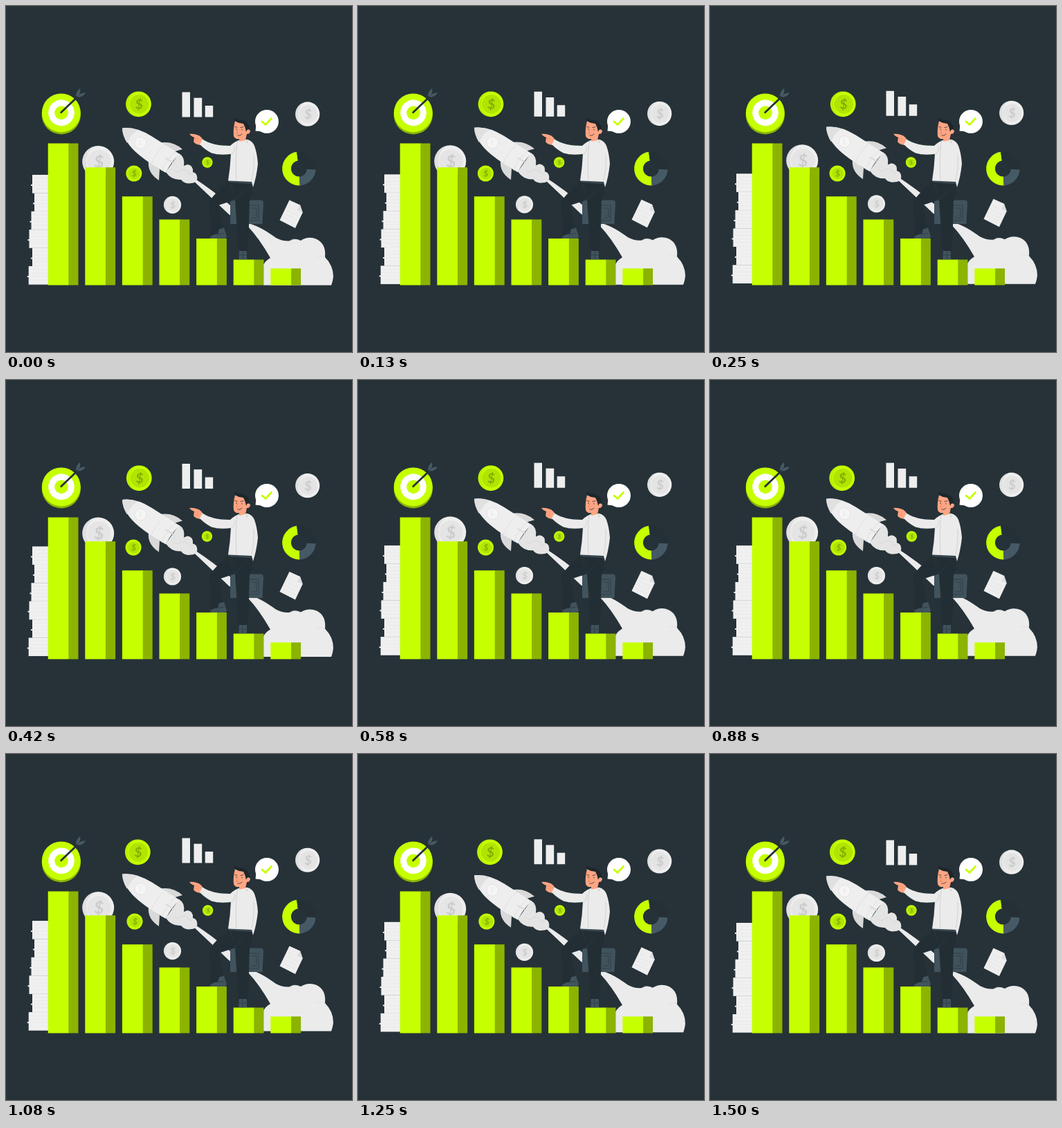
Animation of 500x500 px, one loop 1540 ms. Source, as an HTML page:

```html
<!DOCTYPE html>
<html lang="en">
<head>
<meta charset="utf-8">
<title>Growth chart</title>
<style>
  html, body { margin: 0; width: 100%; height: 100%; overflow: hidden; background: #263238; }
  svg { display: block; width: 100vw; height: 100vh; }
  .line { fill: none; stroke-linecap: round; stroke-linejoin: round; }
  .green { color: #c6ff00; --face: .1; --sign: .24; }
  .pale { color: #eee; --face: .04; --sign: .1; }
</style>
</head>
<body>
<svg viewBox="0 0 500 500">
  <defs>
    <g id="coin">
      <circle r="20" fill="currentColor"/>
      <path d="M-4-19.6A20 20 0 0 0-4 19.6A23 23 0 0 1-4-19.6" opacity=".06"/>
      <circle cx="1" r="15" style="opacity: var(--face)"/>
      <text x="1" y="7.5" text-anchor="middle" font-family="Lato, sans-serif" font-weight="700" font-size="21" transform="rotate(5)" style="opacity: var(--sign)">$</text>
    </g>
  </defs>

  <g id="bob">
    <g id="papers" fill="#f0f0f0"></g>
    <g class="pale">
      <use href="#coin" transform="translate(133.2 225) scale(1.15)"/>
      <use href="#coin" transform="translate(240.5 287.5) scale(.63)"/>
      <use href="#coin" transform="translate(435.7 156.2) scale(.88)"/>
    </g>
    <path d="M254.5 124.5h11.5v36h-11.5zM271.5 132.7h11.7v27.8h-11.7zM287.7 144h11.5v16.5h-11.5z" fill="#eee"/>

    <!-- rocket and exhaust -->
    <path d="M269 247Q300 267 324 288L352 314.5C366 319 378 326 390 335Q402 341 411 339Q418 335 426 339Q437 332 449 337Q463 344 461 363Q473 375 473 391Q472 399 470 403.5H372V374Q375 368 382 364Q366 336 350 319L322 301Q302 282 267 249" fill="#ebebeb"/>
    <path d="M411 339Q416 335 424 339M449 362Q456 360 461 363" class="line" stroke="#ddd" stroke-width=".7"/>
    <path d="M221 198Q240 194 255 207L241 211ZM206 224Q204 241 221 252L222 236Z" fill="#d9d9d9"/>
    <path d="M231 240Q239 252 253 251Q258 258 268 256Q278 255 276 246Q275 241 270 240Q271 230 262 229L257 231Q259 218 250 213Z" fill="#e4e4e4"/>
    <path d="M243 238Q249 243 252 238Q257 235 262 239Q264 244 270 243" class="line" stroke="#d4d4d4" stroke-width=".8"/>
    <path d="M168 176.5Q188 174 211 188.5L251 214Q239 224 231 241Q209 229 192 215Q170 197 168 176.5" fill="#eee"/>
    <path d="M168 176.5Q179 175 190 179Q180 186 175 198Q168 187 168 176.5" fill="#e0e0e0"/>
    <path d="M229 201Q215 214 210 228M244 211Q231 222 225 238" class="line" stroke="#dcdcdc" stroke-width=".8"/>
    <path d="M231 220L242 227" class="line" stroke="#d8d8d8" stroke-width="1.6"/>
    <circle cx="194.5" cy="198" r="8.5" fill="#f5f5f5" stroke="#e4e4e4"/>
    <path d="M194 194v7" class="line" stroke="#e2e2e2"/>

    <path d="M409.5 280.5L425 287.5L428.7 298.5L418 321L395.5 309.5Z" fill="#eee"/>
    <path d="M425 287.5L421 295L428.7 298.5Z" fill="#dedede"/>
    <path d="M408 290l9 4M405 295l17 8M402 300l17 8M400 305l17 8" class="line" stroke="#e2e2e2" stroke-width=".7"/>
  </g>

  <g id="bars"></g>

  <g class="green">
    <use id="coinA" href="#coin"/>
    <use id="coinB" href="#coin"/>
    <use id="coinC" href="#coin"/>
  </g>

  <!-- target -->
  <circle cx="79.8" cy="157.3" r="28.1" fill="#8bb300"/>
  <circle cx="79.8" cy="154.4" r="28" fill="#c6ff00"/>
  <circle cx="80" cy="154.4" r="18.8" fill="#fff"/>
  <circle cx="80" cy="154.4" r="9.8" fill="#c6ff00"/>
  <path d="M79.7 153.8L103 131.5" class="line" stroke="#263238" stroke-width="2.8"/>
  <path d="M101 130.5Q101 123 107 119Q109 126 103 130.5ZM103 131.5Q107 124.5 115 125.5Q111 132.5 103 131.5" fill="#455a64"/>

  <!-- donut -->
  <g fill="none" stroke-width="12.8">
    <path d="M421 217.2A18 18 0 0 0 424.3 253" stroke="#c6ff00"/>
    <path d="M424.3 253A18 18 0 0 0 441.2 236" stroke="#455a64"/>
    <path d="M441.2 236A18 18 0 0 0 421 217.2" stroke="#243036"/>
  </g>

  <!-- man with briefcase -->
  <path d="M326 280.5H368Q372 280.5 372 285L370.5 315H324V285Q324 280.5 326 280.5" fill="#41535d"/>
  <path d="M335 281v-4h18v4M351 288h14v22h-14M355 292h7v14h-7" class="line" stroke="#2c3a42" stroke-width=".8"/>
  <path d="M322 253L355 254Q358 268 352 281L350 355H336L331 280L307 288L316 329L296 332L294 283Q297 275 322 253" fill="#232e34"/>
  <path d="M329 280Q337 276 342 267M325 258Q326 265 329 268" class="line" stroke="#2e3c44" stroke-width=".7"/>
  <path d="M322 252L355 254V257L322 255Z" fill="#37474f"/>
  <path d="M294.5 335.5Q297 330 306 329.5L308 322.5L315 320.5L319 333L317 336H294.5ZM336.8 354H348V366H336.5Z" fill="#41535d"/>
  <path d="M306 329.5l9-1M337 360h11M342 354v12" class="line" stroke="#2c3a42" stroke-width=".7"/>
  <path d="M265 185Q271 184 277 186.5Q282 188 285 194L281 201Q273 200 271 196L272 190Q267 188 265 185" fill="#ffa583"/>
  <path d="M273 190l5 2M272 194l5 1" class="line" stroke="#e08468" stroke-width=".6"/>
  <path d="M284 192.5Q298 202 324 202Q331 195 340 193H349Q356 195 359 202Q363 213 364 228Q362 247 357 262L355 254L321 252.5Q324 234 325 214Q308 216 297 212.5Q288 208 280 200Z" fill="#ebebeb"/>
  <path d="M325 214Q331 211 331 203M334 196Q331 222 333 252M346 196l3 2l-1-5M358 215Q359 236 355 252" class="line" stroke="#c8c8c8" stroke-width=".7"/>
  <path d="M331 166Q328 178 329 188Q331 193 337 192L337 196L346 194L348 185Q353 185 353 180Q350 177 348 179L345 167Z" fill="#ffa583"/>
  <path d="M331 166.5L330 160.5Q334 165 340 164.5Q351 166 352 178Q349 177 347 182Q346 175 343 170Q336 169.5 331 166.5" fill="#1c262b"/>
  <path d="M331 174.5l3 .8M339 175.5l4-.7M333 177.3v1.2M341 178v1.2M335 187Q339 188 341 185" class="line" stroke="#263238" stroke-width=".8"/>
  <path d="M335 179l-2 5h2" class="line" stroke="#d9775c" stroke-width=".7"/>

  <!-- speech bubble -->
  <path d="M361.5 171L360.5 180.5L370 181.5Z" fill="#fff"/>
  <circle cx="377" cy="167" r="17" fill="#fff"/>
  <path d="M370 167L375 171.5L383.5 162.5" class="line" stroke="#c6ff00" stroke-width="2.8"/>
</svg>
<script>
  const $ = id => document.getElementById(id);
  const LOOP = 1540, LEAD = 45, BOTTOM = 403.4;

  const barTops = [198.5, 233.2, 275.2, 308.5, 336, 366.5, 379.3];
  $('bars').innerHTML = barTops.map((top, i) => {
    const x = 60.7 + i * 53.6, h = BOTTOM - top;
    return `<rect x="${x}" y="${top}" width="30.2" height="${h}" fill="#c6ff00"/>
      <rect x="${x + 29.8}" y="${top}" width="14" height="${h}" fill="#8bb300"/>`;
  }).join('');

  const stackLefts = [38, 41, 36.5, 33.5, 38, 32.7];
  $('papers').innerHTML = stackLefts.map((x, i) => {
    const y = 244 + i * 26.4;
    const sheets = [5, 10, 15, 20].map(d => `M${x + 2} ${y + d}H61`).join('');
    return `<rect x="${x}" y="${y}" width="${62 - x}" height="26.5"/>
      <rect x="${x - 2}" y="${y + 14}" width="4" height="2"/>
      <path d="${sheets}M${x} ${y + 26}H61" stroke="#e6e6e6" stroke-width=".6"/>`;
  }).join('');

  const coins = [
    ['coinA', 191.3, 141.8, .92, 1],
    ['coinB', 185, 242, .575, -1],
    ['coinC', 291, 226, .385, -.6],
  ];

  function draw(now) {
    const angle = (now + LEAD) % LOOP / LOOP * 2 * Math.PI;
    $('bob').setAttribute('transform', `translate(0 ${-2.65 * (1 - Math.cos(angle))})`);
    for (const [id, x, y, scale, sway] of coins) {
      $(id).setAttribute('transform', `translate(${x + sway * Math.sin(angle)} ${y}) scale(${scale})`);
    }
    requestAnimationFrame(draw);
  }
  draw(performance.now());
</script>
</body>
</html>
```
